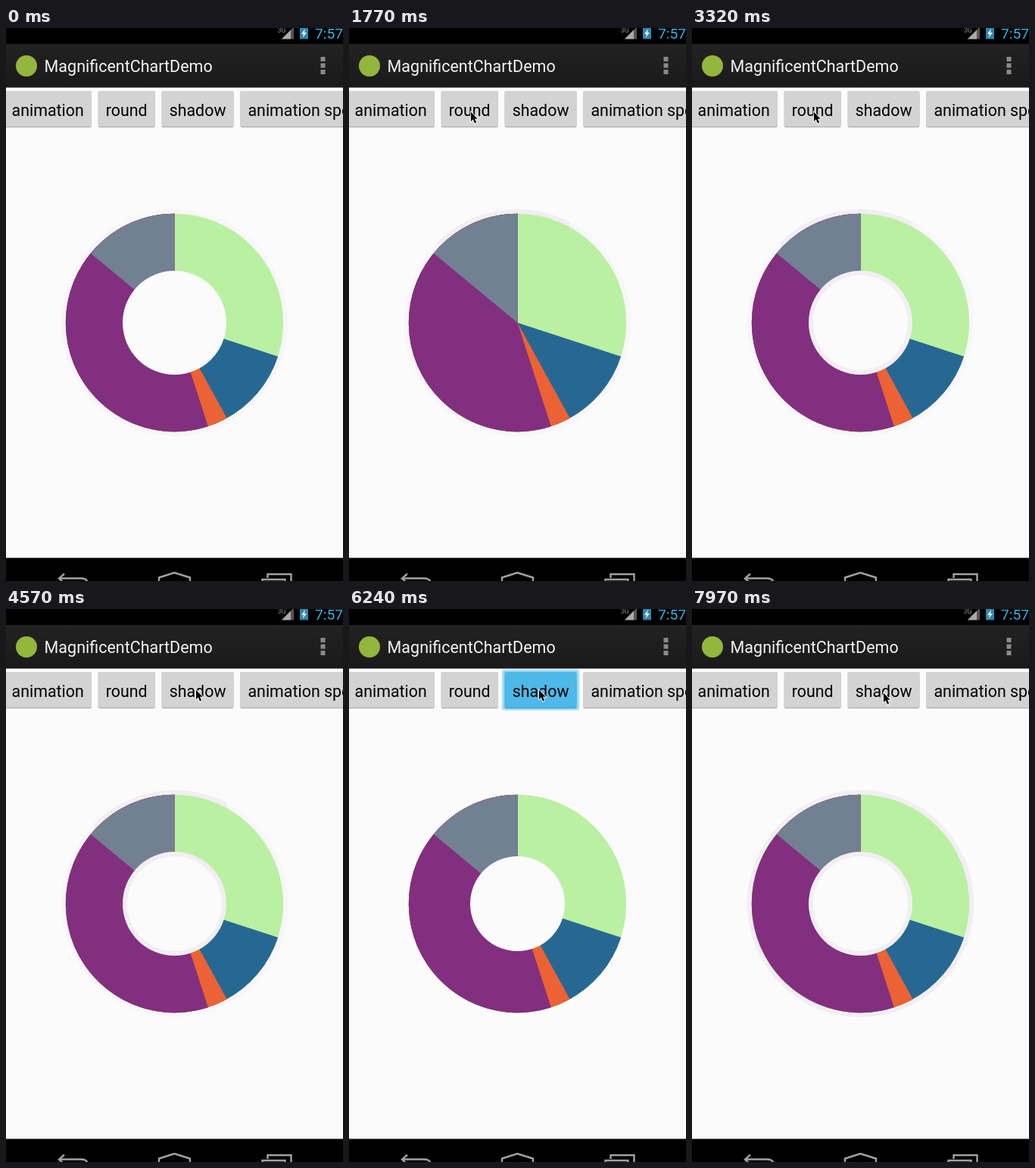
These frames come from a looping animation (445 px wide and 729 px high, 8 s). An HTML page with a canvas:

```html
<!DOCTYPE html>
<html lang="en">
<head>
<meta charset="utf-8">
<title>Chart demo</title>
<style>
html, body { margin: 0; width: 100%; height: 100%; overflow: hidden; background: #fbfbfb; }
canvas { display: block; }
</style>
</head>
<body>
<canvas id="stage" width="445" height="729"></canvas>
<script>
const ctx = document.getElementById('stage').getContext('2d');
const W = 445, H = 729, LOOP = 8000;
const PAPER = '#fbfbfb', RING = '#f2eef3', FAINT_RING = '#f8f6f9';
const CX = 222.5, CY = 388.5, RADIUS = 143.7, HOLE = 68.5, BAND = 6;

// Percent and colour, clockwise from the top
const slices = [[30, '#baf0a2'], [12, '#276893'], [3, '#ec6234'], [41, '#822f80'], [14, '#728191']];
const labels = ['animation', 'round', 'shadow', 'animation speed'];

// Pointer moves: start, end, destination
const moves = [
  [360, 800, 133, 118],
  [800, 1110, 160, 110],
  [3920, 4570, 250, 106],
  [6600, 7130, 178, 109],
  [7250, 7970, 252, 110]
];

const within = (t, a, b) => t >= a && t < b;

function rect(x, y, w, h, color, r = 0) {
  ctx.fillStyle = color;
  ctx.beginPath();
  ctx.roundRect(x, y, w, h, r);
  ctx.fill();
}

function sector(r, color, from = 0, to = 100) {
  const angle = percent => (percent / 50 - .5) * Math.PI;
  ctx.fillStyle = color;
  ctx.beginPath();
  ctx.moveTo(CX, CY);
  ctx.arc(CX, CY, r, angle(from), angle(to));
  ctx.fill();
}

function fill(d, color) {
  ctx.fillStyle = color;
  ctx.fill(new Path2D(d));
}

function stroke(d, color, width) {
  ctx.strokeStyle = color;
  ctx.lineWidth = width;
  ctx.stroke(new Path2D(d));
}

function text(s, x, y, size, color) {
  ctx.font = `${size}px Roboto, sans-serif`;
  ctx.fillStyle = color;
  ctx.fillText(s, x, y);
}

function drawStatusBar() {
  rect(0, 0, W, 21, '#000');
  text('3G', 358.5, 5.5, 9, '#8c8c8c');
  fill('M364 14.5h16v-16z', '#555');
  fill('M364 14.5h12v-12z', '#aaa');
  rect(388, -1, 11, 15.5, '#2f86ae');
  fill('M395 1l-5 7h3l-1.5 5 5.5-7h-3z', '#e8f6fc');
  text('7:57', 408, 14, 19.2, '#33b5e5');
}

function drawActionBar() {
  const shade = ctx.createLinearGradient(0, 21, 0, 78);
  shade.addColorStop(0, '#222');
  shade.addColorStop(1, '#1a1a1a');
  rect(0, 21, W, 57, shade);
  rect(0, 78, W, 1, '#808080');
  ctx.fillStyle = '#93b63c';
  ctx.beginPath();
  ctx.arc(27, 50, 14, 0, 2 * Math.PI);
  ctx.fill();
  text('MagnificentChartDemo', 50.6, 58, 21.5, '#f3f3f3');
  for (let i = 0; i < 3; i++) rect(415.5, 38 + 8.5 * i, 6, 6, '#8a8a8a');
}

function drawButtons(pressed) {
  const size = 21.4, pad = 10, gap = 9;
  let x = -2.5;
  for (const label of labels) {
    ctx.font = `${size}px Roboto, sans-serif`;
    const w = ctx.measureText(label).width + 2 * pad, down = label === pressed;
    if (down) {
      rect(x - 4, 79.5, w + 8, 54.5, '#bde7f6', 4);
      rect(x - 2.5, 81, w + 5, 51.5, '#98d9f1', 3);
    }
    rect(x, 83, w, 48, down ? '#3f9cc6' : '#a3a3a3', 2);
    rect(x, 83, w, 47, down ? '#4db8e9' : '#d3d3d3', 2);
    text(label, x + pad, 115.5, size, '#000');
    x += w + gap;
  }
}

function drawChart(t) {
  const shadow = t < 5040 || t >= 6360;
  if (shadow) sector(RADIUS + BAND, t < 6360 ? FAINT_RING : RING);
  if (within(t, 1770, 5040)) {
    // Only the repainted area shows the stronger ring
    ctx.save();
    ctx.beginPath();
    ctx.rect(117, 78, 175, 379);
    ctx.clip();
    sector(RADIUS + BAND, RING);
    ctx.restore();
  }
  // Each slice runs on to the top so that no seams show
  let from = 0;
  for (const [percent, color] of slices) {
    sector(RADIUS, color, from);
    from += percent;
  }
  if (within(t, 1770, 3320)) return;
  if (shadow) sector(HOLE, t < 1770 ? PAPER : RING);
  sector(HOLE - BAND, PAPER);
}

function drawNavBar() {
  rect(0, 698.5, W, H, '#000');
  stroke('M77 719.5l-7 6.2 7 6M72 725.5h27q8 0 9 6', '#a2a2a2', 2.4);
  stroke('M202 731v-6.5l20.3-6.5 20.7 6.5v6.5', '#a2a2a2', 2.4);
  stroke('M345.5 725v-5h31v11M338.5 731v-4h30v4', '#a2a2a2', 2.4);
}

function drawPointer(t) {
  if (t < moves[0][0]) return;
  let x = 430, y = 124;
  for (const [start, end, toX, toY] of moves) {
    const k = Math.min(1, Math.max(0, (t - start) / (end - start)));
    const ease = k * k * (3 - 2 * k);
    x += (toX - x) * ease;
    y += (toY - y) * ease;
  }
  const arrow = 'M0 0v12.2l2.8-2.5 2.2 5.1 2.2-1-2.2-4.9h3.7z';
  ctx.save();
  ctx.translate(x + 1, y + .8);
  stroke(arrow, '#fff', 1.6);
  fill(arrow, '#000');
  ctx.restore();
}

function pressedAt(t) {
  if (within(t, 1410, 1770) || within(t, 3140, 3320)) return 'round';
  if (within(t, 4930, 5040) || within(t, 6240, 6360)) return 'shadow';
}

function frame() {
  const t = performance.now() % LOOP;
  rect(0, 0, W, H, PAPER);
  drawStatusBar();
  drawActionBar();
  drawButtons(pressedAt(t));
  drawChart(t);
  drawNavBar();
  drawPointer(t);
  requestAnimationFrame(frame);
}
frame();
</script>
</body>
</html>
```
